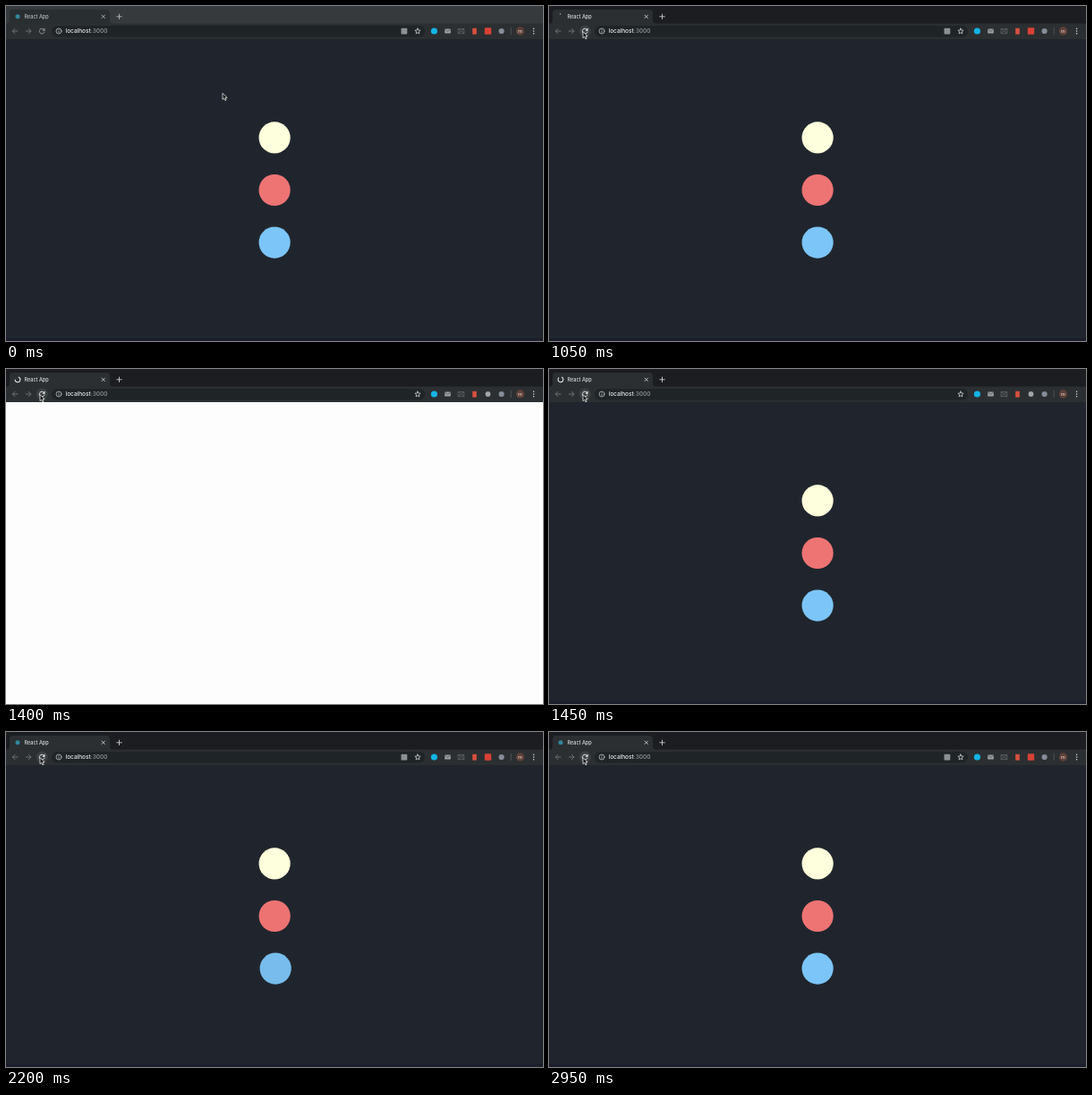
Write an HTML page that moves like this. It is 600 by 374 pixels and loops after 3 s.

```html
<!DOCTYPE html>
<html lang="en">
<head>
<meta charset="utf-8">
<title>Staggered circles</title>
<style>
  html, body { margin: 0; width: 100%; height: 100%; overflow: hidden; background: #20252d; }
  svg { display: block; width: 600px; height: 374px; }
  text { font-family: Inter, Roboto, sans-serif; font-weight: 500; }
  .line { fill: none; stroke-width: .9; stroke-linecap: round; stroke-linejoin: round; }
</style>
</head>
<body>
<svg viewBox="0 0 600 374">
  <rect id="page" y="37" width="600" height="337" fill="#20252d"/>
  <g id="content">
    <rect y="370.5" width="600" height="3.5" fill="#1c1f2b"/>
    <circle class="ball" cx="300.1" cy="146.9" r="17.6" fill="#feffdc"/>
    <circle class="ball" cx="300.1" cy="205.5" r="17.6" fill="#ee7474"/>
    <circle class="ball" cx="300.1" cy="264.1" r="17.6" fill="#7cc5f8"/>
  </g>

  <!-- tab strip and toolbar -->
  <rect id="strip" width="600" height="20"/>
  <path id="tab" d="M0 20Q4 20 4 16V8Q4 4 8 4H112Q116 4 116 8V16Q116 20 120 20Z"/>
  <rect y="19.5" width="600" height="17.5" fill="#2b2f31"/>
  <rect x="51" y="22" width="417" height="12.5" rx="6.2" fill="#1f2426"/>
  <circle id="favicon" cx="13" cy="11.8" r="2.5" fill="#32869c"/>
  <path id="spinner" class="line" stroke="#e4e7e8" style="stroke-width:1.1"/>
  <text id="title" x="20.5" y="13.8" font-size="5.5">React App</text>
  <path id="tabButtons" class="line" d="M107 10.1l3.4 3.4M110.4 10.1l-3.4 3.4M123.8 11.8h5.4M126.5 9.1v5.4"/>

  <!-- navigation -->
  <path class="line" stroke="#707679" d="M13 28H7.4M10 25.3L7.3 28L10 30.7M22.3 28H27.9M25.3 25.3L28 28L25.3 30.7"/>
  <circle id="hover" cx="40.3" cy="28" r="6.5" fill="#3b4042"/>
  <g id="reload">
    <path class="line" d="M42.4 26.1A2.9 2.9 0 1 0 43 29" stroke="currentColor"/>
    <path d="M43.5 24.6V27.7H40.4Z" fill="currentColor"/>
  </g>
  <circle cx="59" cy="28" r="3" class="line" stroke="#b9bec0" style="stroke-width:.8"/>
  <path class="line" stroke="#b9bec0" style="stroke-width:.8" d="M59 27.8v1.7M59 26.3v.1"/>
  <text x="66.5" y="30.4" font-size="6.5" fill="#e9ebec">localhost<tspan fill="#92989b">:3000</tspan></text>

  <!-- toolbar icons -->
  <rect id="translate" x="441.5" y="24.7" width="6.8" height="6.8" rx=".7" fill="#8b9194"/>
  <path class="line" stroke="#d0d4d6" style="stroke-width:.8" d="M460 25l.9 2 2.2.2-1.7 1.5.5 2.2-1.9-1.2-1.9 1.2.5-2.2-1.7-1.5 2.2-.2z"/>
  <circle cx="478.4" cy="28" r="3.6" fill="#14b4e4"/>
  <rect x="490.2" y="25.6" width="6.6" height="5" rx=".7" fill="#9ba1a4"/>
  <path class="line" stroke="#3b4043" style="stroke-width:.7" d="M490.6 26.2l2.9 2.2 2.9-2.2"/>
  <path class="line" stroke="#666c6f" style="stroke-width:.7" d="M505.4 25.5h6.4v5.1h-6.4zM505.5 25.6l3.1 2.5 3.1-2.5M505.5 30.5l2.2-2.4M511.7 30.5l-2.2-2.4"/>
  <rect x="521.2" y="24.8" width="4.6" height="6.8" fill="#d8503e"/>
  <rect id="toolDev" x="534.8" y="24.3" width="7.4" height="7.4" rx=".8" fill="#d94135"/>
  <circle id="toolIdle" cx="538.5" cy="28" r="2.9" fill="#a0a5a8"/>
  <circle cx="553.6" cy="28" r="3.1" fill="#858b98"/>
  <rect x="563.8" y="24" width=".7" height="8" fill="#5a6063"/>
  <circle cx="574.5" cy="28" r="4.7" fill="#5e4038"/>
  <text x="574.5" y="29.9" font-size="5.4" fill="#d9cec9" text-anchor="middle">m</text>
  <g fill="#d8dcde">
    <circle cx="589.6" cy="25.3" r=".8"/><circle cx="589.6" cy="28" r=".8"/><circle cx="589.6" cy="30.7" r=".8"/>
  </g>

  <path id="cursor" d="M0 0V7.1L1.7 5.6L2.9 8.2L4.1 7.7L3 5.1H5.1Z" fill="#111" stroke="#f2f2f2" stroke-width=".75" stroke-linejoin="round"/>
</svg>
<script>
const LOOP = 3000;
const time = {
  activate: 225, moveStart: 225, moveEnd: 850, reload: 1000,
  blank: 1075, mounted: 1425, visible: 1475, loaded: 1600,
  translate: 1690, extension: 1975
};
const stagger = { start: 1391, gap: 200, duration: 800, shift: 18.75 };
const byId = id => document.getElementById(id);
const balls = document.querySelectorAll('.ball');
const clamp = v => Math.max(0, Math.min(1, v));
const between = (t, a, b) => t >= a && t < b;
const show = (id, on) => byId(id).setAttribute('display', on ? 'inline' : 'none');
const paint = (id, attr, color) => byId(id).setAttribute(attr, color);
const smooth = u => u * u * (3 - 2 * u);
const quartOut = u => 1 - (1 - u) ** 4;

function arc(cx, cy, r, from, sweep) {
  const point = deg => {
    const a = deg * Math.PI / 180;
    return `${cx + r * Math.cos(a)} ${cy + r * Math.sin(a)}`;
  };
  return `M${point(from)}A${r} ${r} 0 ${sweep > 180 ? 1 : 0} 1 ${point(from + sweep)}`;
}

// The circles are painted once at rest before the staggered entrance takes over.
function drawBalls(t) {
  balls.forEach((ball, i) => {
    const elapsed = t - stagger.start - stagger.gap * i;
    const p = t < time.visible ? 1 : quartOut(clamp(elapsed / stagger.duration));
    ball.setAttribute('opacity', p);
    ball.setAttribute('transform', `translate(${stagger.shift * (1 - p)} 0)`);
  });
}

function drawChrome(t) {
  const active = t >= time.activate;
  paint('strip', 'fill', active ? '#1b1d20' : '#363a3d');
  paint('tab', 'fill', active ? '#2b2f31' : '#292e30');
  paint('title', 'fill', active ? '#d9dddf' : '#b9bec0');
  paint('tabButtons', 'stroke', active ? '#c9cdcf' : '#b0b5b8');

  const loading = between(t, time.reload, time.loaded);
  show('favicon', !loading);
  show('spinner', loading);
  const grow = clamp((t - 1100) / 350);
  byId('spinner').setAttribute('d', arc(13, 11.8, 2.9, 258 + 42 * grow + Math.max(0, t - 1450) * .4, 6 + 274 * grow));

  show('translate', !between(t, time.blank, time.translate));
  const idle = between(t, time.blank, time.extension);
  show('toolDev', !idle);
  show('toolIdle', idle);
}

function drawCursor(t) {
  const u = smooth(clamp((t - time.moveStart) / (time.moveEnd - time.moveStart)));
  const x = 242 - 204 * u, y = 97.3 - 68.7 * u;
  const over = Math.hypot(x - 40.3, y - 28) < 7;
  byId('cursor').setAttribute('transform', `translate(${x} ${y})`);
  show('hover', over);
  paint('reload', 'color', over ? '#f0f2f3' : '#969c9f');
}

function draw(t) {
  const blank = between(t, time.blank, time.mounted);
  paint('page', 'fill', blank ? '#fdfdfd' : '#20252d');
  show('content', !blank);
  drawBalls(t);
  drawChrome(t);
  drawCursor(t);
}

const start = performance.now();
function tick() {
  draw((performance.now() - start) % LOOP);
  requestAnimationFrame(tick);
}
tick();
</script>
</body>
</html>
```
